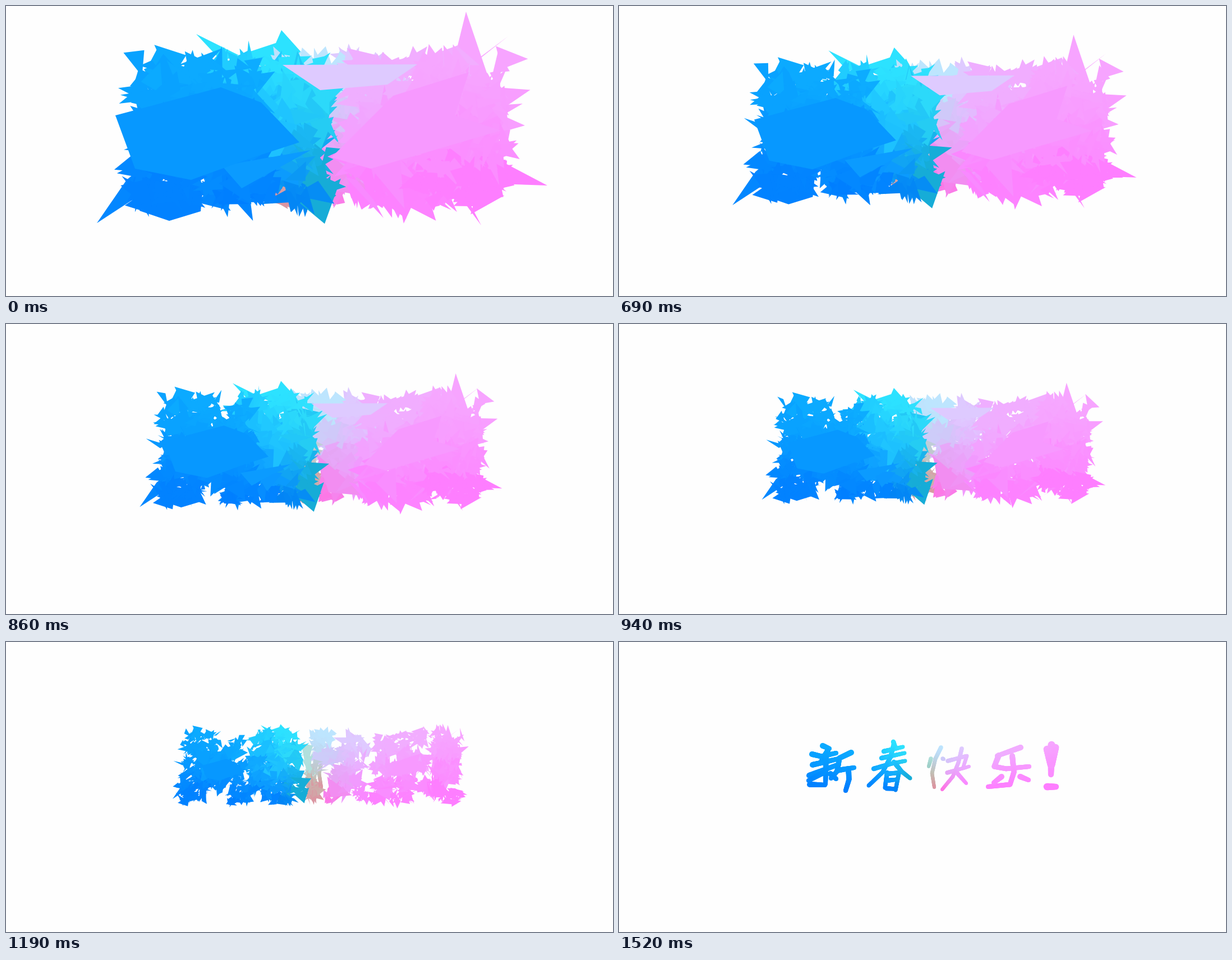
Write an HTML page with a canvas that moves like this. It is 1082x517 px and loops after 2.19 s.

```html
<!DOCTYPE html>
<html lang="zh">
<head>
<meta charset="utf-8">
<title>新春快乐!</title>
<style>
html, body { margin: 0; width: 100%; height: 100%; overflow: hidden; background: #fefefe; }
canvas { display: block; }
</style>
</head>
<body>
<canvas id="stage" width="1082" height="517" role="img" aria-label="新春快乐!"></canvas>
<script>
const ctx = document.getElementById('stage').getContext('2d');
const LOOP = 2190;
const STEPS = [610, 690, 770, 860, 940, 1020, 1110, 1190, 1270, 1350, 1440, 1520];
const MID_X = 565, MID_Y = 223;

// Brush letters as a few key points per stroke
const LETTERS = [
  { width: 9.5, strokes: `363 185 375 190, 344 200 361 204 387 198, 372 194 361 211, 345 219 392 208,
    339 238 392 218, 340 254 367 255, 369 205 368 253, 366 232 338 247, 377 235 387 244,
    414 197 393 207 389 230 378 243, 389 229 419 224, 409 226 410 245 404 265` },
  { width: 8, strokes: `489 178 493 188, 472 195 506 187, 468 207 509 198, 454 226 485 217 510 212,
    490 182 484 205 470 232 445 256, 490 214 504 231 519 243, 478 233 474 260,
    478 235 499 233 493 264, 478 247 496 245, 477 261 492 262` },
  { width: 7, strokes: `574 188 564 208 558 234 562 259, 556 208 552 222, 577 208 579 209,
    586 212 620 203 613 225, 585 233 624 222, 611 190 605 215 595 240 576 263, 603 234 619 252` },
  { width: 9.5, strokes: `716 188 674 203, 677 202 669 222 690 226 731 222, 701 203 704 232 697 254 658 258,
    682 240 668 251, 715 240 730 246` },
  { width: 12, strokes: `771 183 770 236, 763 191 769 220, 778 188 772 220, 763 258 779 258` }
];
const DRAW_ORDER = [2, 1, 3, 4, 0];

// The largest scattered outlines, behind and in front of the shards
const SPIKES = [
  '162 387 215 310 285 252 280 310', '250 325 238 365 291 383 347 366 352 315',
  '339 50 384 98 481 66 491 43 526 82 500 130', '755 130 796 107 820 10 875 172 850 220',
  '870 270 965 320 850 316 810 270', '830 180 921 174 885 195 925 213 830 240',
  '895 54 847 92 820 110', '780 300 847 391 800 300'
];
const PLATES = [
  '493 105 733 104 680 140 560 150', '580 270 690 160 825 118 800 195 882 222 650 290',
  '605 305 673 378 655 345 625 310', '385 285 543 257 420 325',
  '195 195 383 145 455 172 523 243 440 270 330 310 230 290'
];

// Colour field: x, colour at the top, colour at the bottom
const FIELD = [
  [335, '0aa8ff', '007bff'], [430, '10b4ff', '007fff'], [488, '2ce2ff', '0080ff'],
  [530, '38e8ff', '0a98b0'], [556, 'a8f4ff', 'cca070'], [572, 'b8ecff', 'ff70e0'],
  [610, 'dcd0ff', 'ff7aff'], [690, 'efb4ff', 'ff7aff'], [786, 'f7a5ff', 'ff7aff']
];

const clamp = (v, lo, hi) => Math.max(lo, Math.min(hi, v));
const mix = (a, b, t) => a + (b - a) * t;
const mixRgb = (a, b, t) => a.map((v, i) => mix(v, b[i], t));
const rgb = hex => [0, 2, 4].map(i => parseInt(hex.slice(i, i + 2), 16));
const numbers = text => text.trim().split(/\s+/).map(Number);

function colorAt(x, y) {
  let i = 0;
  while (i < FIELD.length - 2 && x > FIELD[i + 1][0]) i++;
  const [x0, top0, low0] = FIELD[i], [x1, top1, low1] = FIELD[i + 1];
  const across = clamp((x - x0) / (x1 - x0), 0, 1);
  const down = clamp((y - 180) / 84, 0, 1) ** 1.3;
  const top = mixRgb(rgb(top0), rgb(top1), across);
  const low = mixRgb(rgb(low0), rgb(low1), across);
  return `rgb(${mixRgb(top, low, down).map(Math.round)})`;
}

let seed = 2024;
function random() {
  seed = (seed + 0x6D2B79F5) | 0;
  let t = Math.imul(seed ^ (seed >>> 15), 1 | seed);
  t = (t + Math.imul(t ^ (t >>> 7), 61 | t)) ^ t;
  return ((t ^ (t >>> 14)) >>> 0) / 4294967296;
}
const spread = r => (random() * 2 - 1) * r;

// Dots about one pixel apart, thinning a little towards the stroke's end
function strokeDots(text, width) {
  const p = numbers(text), legs = p.length / 2 - 1, dots = [];
  for (let i = 0; i < legs; i++) {
    const [x0, y0, x1, y1] = p.slice(i * 2, i * 2 + 4);
    const n = Math.ceil(Math.hypot(x1 - x0, y1 - y0));
    for (let j = 0; j <= n; j++) {
      const t = j / n, x = mix(x0, x1, t), y = mix(y0, y1, t);
      dots.push({ x, y, r: width / 2 * (1.06 - 0.2 * (i + t) / legs), color: colorAt(x, y) });
    }
  }
  return dots;
}

function nearest(dots, x, y) {
  const gap = d => Math.hypot(d.x - x, d.y - y);
  return dots.reduce((best, d, i) => gap(d) < gap(dots[best]) ? i : best, 0);
}

// Shards fill a wide block and gather on the part of the letter facing them
function makeShards(dots) {
  const xs = dots.map(d => d.x);
  const left = Math.min(...xs), right = Math.max(...xs);
  const cx = (left + right) / 2, half = (right - left) / 2;
  const blockX = cx + (cx - MID_X) * 0.2, blockW = half + 68, blockH = 122;
  const count = Math.round(blockW * 3.8);
  return Array.from({ length: count }, (_, n) => {
    const big = n % 14 === 0;
    const u = spread(big ? 0.65 : 1), v = spread(big ? 0.65 : 1);
    const at = nearest(dots, cx + u * half, MID_Y + v * 42);
    const turn = random() * Math.PI * 2;
    const points = [0, 1, 2].map(i => {
      const d = dots[clamp(at + Math.round(spread(9)), 0, dots.length - 1)];
      const angle = turn + i * 2.1 + spread(0.6);
      const reach = (10 + 40 * random() ** 2) * (big ? 2 : 1);
      return {
        endX: d.x + spread(d.r / 2), endY: d.y + spread(d.r / 2),
        x: blockX + u * blockW + Math.cos(angle) * reach,
        y: MID_Y + v * blockH + Math.sin(angle) * reach
      };
    });
    return { color: dots[at].color, points, power: 0.8 };
  });
}

function makePiece(text) {
  const p = numbers(text), points = [];
  for (let i = 0; i < p.length; i += 2) points.push({ x: p[i], y: p[i + 1] });
  const mean = axis => points.reduce((sum, q) => sum + q[axis], 0) / points.length;
  const x = MID_X + (mean('x') - MID_X) * 0.85, y = MID_Y + (mean('y') - MID_Y) * 0.34;
  const home = allDots[nearest(allDots, x, y)];
  for (const q of points) Object.assign(q, { endX: home.x, endY: home.y });
  return { color: home.color, points, power: 1 };
}

const letterDots = LETTERS.map(l => l.strokes.split(',').flatMap(s => strokeDots(s, l.width)));
const allDots = letterDots.flat();
const pieces = [
  ...SPIKES.map(makePiece),
  ...DRAW_ORDER.flatMap(i => makeShards(letterDots[i])),
  ...PLATES.map(makePiece)
];

function drawPiece({ color, points, power }, away) {
  const k = away ** power;
  ctx.fillStyle = color;
  ctx.beginPath();
  for (const p of points) ctx.lineTo(mix(p.endX, p.x, k), mix(p.endY, p.y, k));
  ctx.fill();
}

function drawDot({ x, y, r, color }) {
  ctx.fillStyle = color;
  ctx.beginPath();
  ctx.arc(x, y, r, 0, Math.PI * 2);
  ctx.fill();
}

function draw(step) {
  const u = step / STEPS.length;
  const away = 1 - u * (1.45 - 0.45 * u);
  ctx.fillStyle = '#fefefe';
  ctx.fillRect(0, 0, 1082, 517);
  if (away < 0.3) allDots.forEach(drawDot);
  if (step < STEPS.length) pieces.forEach(p => drawPiece(p, away));
}

let shown = -1;
const begin = performance.now();
function tick() {
  const t = (performance.now() - begin) % LOOP;
  const step = STEPS.filter(s => t >= s).length;
  if (step !== shown) draw(shown = step);
  requestAnimationFrame(tick);
}
tick();
</script>
</body>
</html>
```
